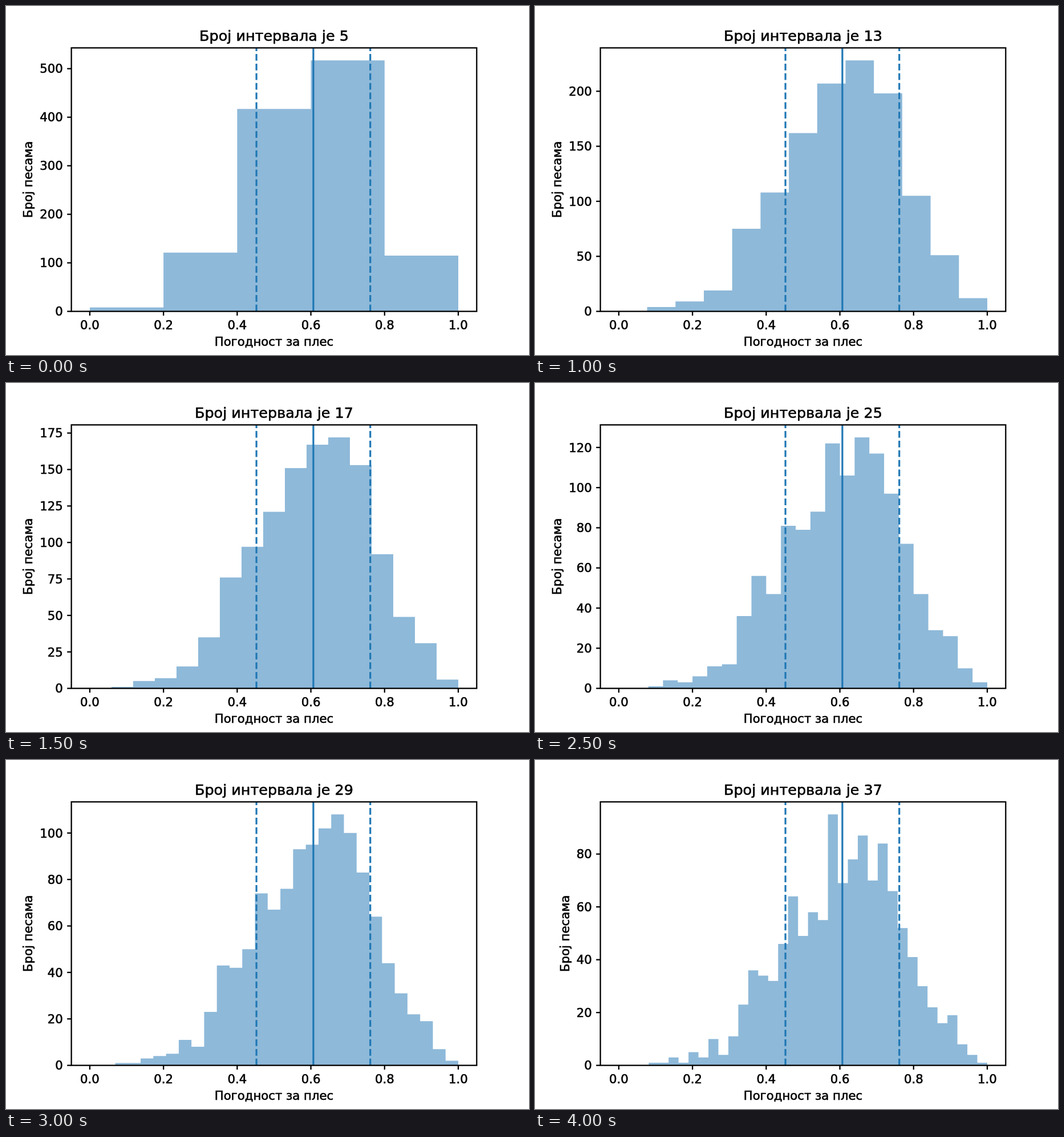
An HTML page with a canvas that plays this animation: 917x611 px, repeating every 4.5 s.

```html
<!DOCTYPE html>
<html lang="sr">
<head>
<meta charset="utf-8">
<title>Број интервала</title>
<style>
  html, body { margin: 0; width: 100%; height: 100%; overflow: hidden; background: #fff; }
  canvas { display: block; }
</style>
</head>
<body>
<canvas id="stage" width="917" height="611"></canvas>
<script>
const ctx = document.getElementById('stage').getContext('2d');
const W = 917, H = 611, HOLD = 500, CHARTS = 9;
const PT = W / 6 / 72, EM = 10 * PT, TICK = 3.5 * PT;
const LEFT = W * 0.125, RIGHT = W * 0.9, TOP = H * 0.12, BOTTOM = H * 0.875;
const UNIT = (RIGHT - LEFT) / 1.1;
const MEAN = 0.6067, SPREAD = 0.1545;
const BAR = '#8eb9d9', LINE = '#1f77b4', INK = '#000';
const FONT = '"DejaVu Sans", Verdana, sans-serif';

// Songs per bin at the finest division; every coarser chart is rebinned from this.
const FINEST = [0, 0, 0, 1, 1, 3, 1, 5, 3, 10, 4, 11, 23, 36, 34, 32, 46, 64, 49, 58, 55, 95,
  69, 78, 87, 70, 84, 66, 52, 41, 30, 22, 16, 19, 8, 4, 1];

// Running totals near the peak, as [score in thousandths, songs below it].
const PEAK = [[400, 129], [556, 418], [572, 444], [600, 546], [616, 584], [620, 592],
  [656, 698], [667, 745], [690, 806], [693, 812], [715, 881], [800, 1063]];

// Scores have three decimals, so bin edges are counted in thousandths.
const edge = (k, n) => Math.ceil(1000 * k / n);

let sum = 0;
const curve = [
  [0, 0],
  ...FINEST.map((c, i) => [edge(i + 1, FINEST.length), sum += c]),
  ...PEAK
].sort((a, b) => a[0] - b[0]);

function songsBelow(x) {
  const i = Math.max(1, curve.findIndex(p => p[0] >= x));
  const [x0, y0] = curve[i - 1], [x1, y1] = curve[i];
  return Math.round(y0 + (y1 - y0) * (x - x0) / (x1 - x0));
}

function tickStep(max) {
  const raw = max / 9, power = 10 ** Math.floor(Math.log10(raw));
  return power * [1, 2, 2.5, 5, 10].find(s => s * power >= raw);
}

function makeChart(n) {
  const counts = Array.from({ length: n }, (_, i) =>
    songsBelow(edge(i + 1, n)) - songsBelow(edge(i, n)));
  const max = Math.max(...counts) * 1.05;
  return { n, counts, max, step: tickStep(max) };
}

const charts = Array.from({ length: CHARTS }, (_, i) => makeChart(5 + 4 * i));

const px = v => LEFT + (v + 0.05) * UNIT;

function text(str, x, y, size = 10, align = 'center') {
  ctx.font = `${size * PT}px ${FONT}`;
  ctx.textAlign = align;
  ctx.fillStyle = ctx.strokeStyle = INK;
  ctx.lineWidth = 0.6;
  ctx.lineJoin = 'round';
  ctx.fillText(str, x, y);
  ctx.strokeText(str, x, y);
}

function line(x0, y0, x1, y1, color = INK, width = 2.3, dash = []) {
  ctx.strokeStyle = color;
  ctx.lineWidth = width;
  ctx.setLineDash(dash.map(d => d * width));
  ctx.beginPath();
  ctx.moveTo(x0, y0);
  ctx.lineTo(x1, y1);
  ctx.stroke();
  ctx.setLineDash([]);
}

const marker = (v, dash) => line(px(v), BOTTOM, px(v), TOP, LINE, 1.5 * PT, dash);

function drawBars(counts, py) {
  const n = counts.length;
  ctx.fillStyle = BAR;
  ctx.beginPath();
  ctx.moveTo(px(0), BOTTOM);
  counts.forEach((c, i) => {
    ctx.lineTo(px(i / n), py(c));
    ctx.lineTo(px((i + 1) / n), py(c));
  });
  ctx.lineTo(px(1), BOTTOM);
  ctx.fill();
}

function draw({ n, counts, max, step }) {
  const py = v => BOTTOM - v / max * (BOTTOM - TOP);
  const middle = (LEFT + RIGHT) / 2;
  ctx.fillStyle = '#fff';
  ctx.fillRect(0, 0, W, H);

  drawBars(counts, py);
  marker(MEAN);
  marker(MEAN - SPREAD, [3.7, 1.6]);
  marker(MEAN + SPREAD, [3.7, 1.6]);

  ctx.strokeStyle = INK;
  ctx.lineWidth = 2.3;
  ctx.lineJoin = 'miter';
  ctx.strokeRect(LEFT, TOP, RIGHT - LEFT, BOTTOM - TOP);

  for (let i = 0; i <= 5; i++) {
    const x = px(i / 5);
    line(x, BOTTOM, x, BOTTOM + TICK);
    text((i / 5).toFixed(1), x, BOTTOM + 2 * TICK + 0.76 * EM);
  }
  let digits = 1;
  for (let v = 0; v <= max; v += step) {
    const y = py(v), label = String(v);
    line(LEFT, y, LEFT - TICK, y);
    text(label, LEFT - 2 * TICK, y + 0.365 * EM, 10, 'right');
    digits = label.length;
  }

  text('Број интервала је ' + n, middle, TOP - 6 * PT, 12);
  text('Погодност за плес', middle, BOTTOM + 2 * TICK + 4 * PT + 1.73 * EM);

  ctx.save();
  ctx.translate(LEFT - 2 * TICK - 4 * PT - (0.636 * digits + 0.208) * EM, (TOP + BOTTOM) / 2);
  ctx.rotate(-Math.PI / 2);
  text('Број песама', 0, 0);
  ctx.restore();
}

const start = performance.now();
function frame() {
  const t = Math.max(0, performance.now() - start);
  draw(charts[Math.floor(t / HOLD) % CHARTS]);
  requestAnimationFrame(frame);
}
frame();
</script>
</body>
</html>
```
